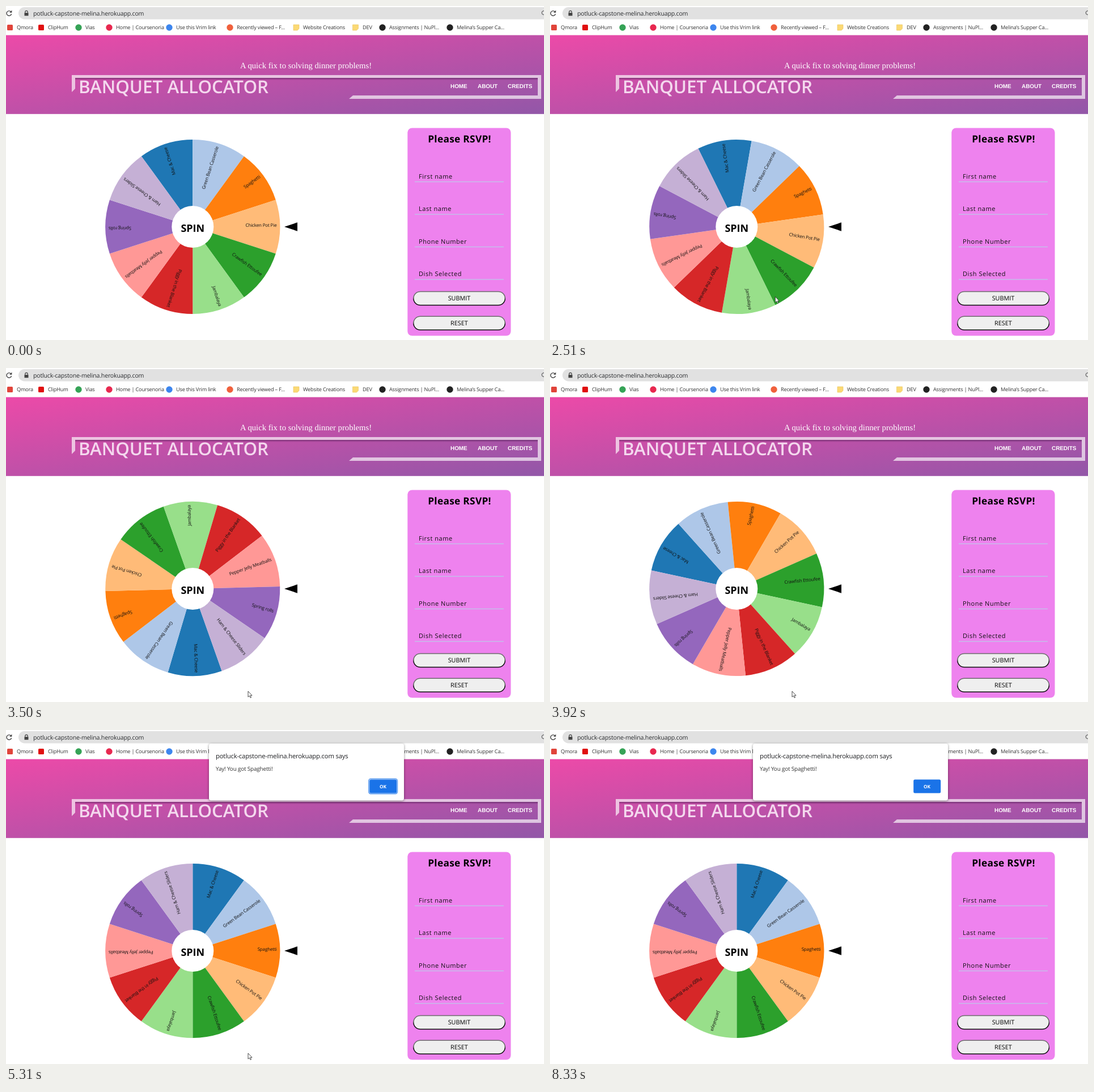
Write an HTML page that moves like this. It is 949x590 px and loops after 8390 ms.

```html
<!DOCTYPE html>
<html lang="en">
<head>
<meta charset="utf-8">
<title>Dinner wheel</title>
<style>
  html, body { margin: 0; width: 100%; height: 100%; overflow: hidden; background: #fff; }
  svg { display: block; width: 100vw; height: 100vh; font-family: "Open Sans", "Noto Sans", sans-serif; text-rendering: geometricPrecision; }
  .url { font-size: 10.6px; letter-spacing: -.2px; fill: #2b2d30; }
  .marks { font-size: 9.2px; letter-spacing: -.2px; fill: #333; }
  .tagline { font: 14.67px "Liberation Serif", serif; fill: #fff; }
  .title { font-size: 31.3px; font-weight: 600; fill: #f4d8ee; }
  .nav { font: bold 9.9px "Liberation Sans", sans-serif; fill: #fff; }
  .dish { font-size: 8px; letter-spacing: -.15px; text-anchor: end; fill: #111; }
  .mid { text-anchor: middle; }
  .spin { font-size: 18px; font-weight: 700; }
  .rsvp { font-size: 17.3px; font-weight: 700; letter-spacing: .3px; }
  .field { font-size: 11px; letter-spacing: .55px; fill: #111; }
  .button { font-size: 10.8px; }
  .says { font-size: 11.3px; letter-spacing: -.2px; fill: #202124; }
  .news { font-size: 9.9px; letter-spacing: -.15px; fill: #333; }
  .ok { font-size: 8.3px; font-weight: 700; fill: #fff; }
  #dialog > rect:first-child { filter: drop-shadow(0 1px 2px rgba(0, 0, 0, .45)); }
</style>
</head>
<body>
<svg viewBox="0 0 949 590" preserveAspectRatio="none">
  <defs>
    <linearGradient id="banner" x2="1" y2="1">
      <stop stop-color="#ec4aa8"/><stop offset="1" stop-color="#9257a8"/>
    </linearGradient>
    <linearGradient id="shade" x2="0" y2="1">
      <stop stop-color="#4a1850" stop-opacity=".6"/><stop offset="1" stop-color="#4a1850" stop-opacity="0"/>
    </linearGradient>
    <linearGradient id="outset" x2="0" y2="1">
      <stop offset=".4" stop-color="#6c6c6c"/><stop offset=".6" stop-color="#0c0c0c"/>
    </linearGradient>
  </defs>

  <!-- browser bar -->
  <rect x="22" y="2" width="960" height="21.5" rx="10.7" fill="#e1e1e1"/>
  <g fill="none" stroke="#444" stroke-width="1.4">
    <path d="M8.8 10.2A4.3 4.3 0 1 0 9.6 14"/>
    <path d="M33.8 12V10.6a2.2 2.2 0 0 1 4.4 0V12" stroke-width="1.2"/>
    <circle cx="948.5" cy="12" r="3.4" stroke-width="1"/>
  </g>
  <path d="M10.4 7.4V11.8H6Z M32.5 12h7v5.2h-7Z" fill="#444"/>
  <text class="url" x="48" y="16.8">potluck-capstone-melina.herokuapp.com</text>
  <g id="marks" class="marks"></g>

  <!-- page header -->
  <rect y="51.5" width="949" height="139.3" fill="url(#banner)"/>
  <rect x="122" y="127" width="816" height="4" fill="url(#shade)"/>
  <path d="M116 122H944V164H605L612 158H938V127H122V146L116 152Z" fill="#fff" fill-opacity=".66"/>
  <text class="tagline" x="413" y="110">A quick fix to solving dinner problems!</text>
  <text class="title" x="128" y="154">BANQUET ALLOCATOR</text>
  <g class="nav">
    <text x="784" y="145">HOME</text><text x="832" y="145">ABOUT</text><text x="885" y="145">CREDITS</text>
  </g>

  <!-- wheel -->
  <g transform="translate(329.3 390)">
    <g id="wheel"></g>
    <circle r="37" fill="#fff"/>
    <text class="spin mid" y="9.2">SPIN</text>
  </g>
  <path d="M491 390L514 382.3V397.7Z"/>

  <!-- form -->
  <rect x="708.3" y="215.5" width="182.2" height="367" rx="8" fill="#ee82ee"/>
  <text class="rsvp mid" x="800" y="241">Please RSVP!</text>
  <g id="fields"></g>

  <!-- alert -->
  <g id="dialog">
    <rect x="358" y="24" width="344" height="100.5" rx="4" fill="#fff"/>
    <text class="says" x="370" y="49.5">potluck-capstone-melina.herokuapp.com says</text>
    <text class="news" x="370" y="71.6">Yay! You got Spaghetti!</text>
    <rect id="ring" x="639.8" y="86.2" width="50.6" height="26.4" rx="3.5" fill="#fff" stroke="#5b9bf0" stroke-width="1.6"/>
    <rect x="641.2" y="87.6" width="48" height="23.8" rx="2.5" fill="#1a73e8"/>
    <text class="ok mid" x="665" y="102.6">OK</text>
  </g>

  <!-- mouse -->
  <circle id="glow" cx="330.5" cy="388.5" r="9.5" fill="#f5e614" fill-opacity=".72"/>
  <g id="mouse">
    <path id="arrow" d="M0 0V10.2L2.4 8 4 11.6 5.6 10.9 4.1 7.4H7Z" fill="#fff" stroke="#222" stroke-width=".8"/>
    <path id="beam" d="M-2.5 -6.5H2.5M0 -6.5V6.5M-2.5 6.5H2.5" fill="none" stroke="#333"/>
  </g>
</svg>
<script>
const LOOP = 8390, TICK = 69.8;
const $ = id => document.getElementById(id);

const bookmarks = [
  [19, 'Qmora', 7, '#e0443a', 'square'],
  [74, 'ClipHum', 62, '#e00f0f', 'square'],
  [140, 'Vias', 128, '#35a356', 'circle'],
  [194, 'Home | Coursenoria', 182, '#e8284f', 'circle'],
  [300, 'Use this Vrim link', 288, '#3d86ee', 'circle'],
  [407, 'Recently viewed – F...', 395, '#f0603c', 'circle'],
  [524, 'Website Creations', 512, '#fbd975', 'folder'],
  [629, 'DEV', 616.5, '#fbd975', 'folder'],
  [676, 'Assignments | NuPl...', 664, '#222', 'circle'],
  [795, 'Melina’s Supper Ca...', 783, '#222', 'circle']
];
const icons = {
  square: (x, c) => `<rect x="${x - 5}" y="33" width="10" height="10" rx="1.5" fill="${c}"/>`,
  circle: (x, c) => `<circle cx="${x}" cy="38" r="5.7" fill="${c}"/>`,
  folder: (x, c) => `<path d="M${x - 5} 33h10v7l-3 3h-7Z" fill="${c}" stroke="#eac35a" stroke-width=".6"/>`
};
$('marks').innerHTML = bookmarks.map(([x, name, ix, color, kind]) =>
  icons[kind](ix, color) + `<text x="${x}" y="41.2">${name}</text>`).join('');

const dishes = [
  ['Mac &amp; Cheese', '#1f77b4'], ['Green Bean Casserole', '#aec7e8'],
  ['Spaghetti', '#ff7f0e'], ['Chicken Pot Pie', '#ffbb78'],
  ['Crawfish Ettoufee', '#2ca02c'], ['Jambalaya', '#98df8a'],
  ['Piggy in the Blanket', '#d62728'], ['Pepper Jelly Meatballs', '#ff9896'],
  ['Spring rolls', '#9467bd'], ['Ham &amp; Cheese Sliders', '#c5b0d5']
];
const R = 154, half = Math.PI / 10;
const ex = R * Math.cos(half), ey = R * Math.sin(half);
$('wheel').innerHTML = dishes.map(([name, color], i) =>
  `<g transform="rotate(${i * 36 - 72})">
    <path d="M0 0L${ex} ${-ey}A${R} ${R} 0 0 1 ${ex} ${ey}Z" fill="${color}"/>
    <text class="dish" x="148.2">${name}</text></g>`).join('');

const field = (name, i) => {
  const y = 304.7 + i * 57.5;
  return `<text class="field" x="728" y="${y}">${name}</text>
    <path d="M721 ${y + 5.8}H878" stroke="#c5bdea" stroke-width="1.5"/>`;
};
const button = (name, y) =>
  `<rect x="718.8" y="${y}" width="161.6" height="24" rx="12" fill="#efefef" stroke="url(#outset)" stroke-width="1.5"/>
   <text class="button mid" x="799.4" y="${y + 15.6}">${name}</text>`;
$('fields').innerHTML =
  ['First name', 'Last name', 'Phone Number', 'Dish Selected'].map(field).join('') +
  button('SUBMIT', 504.5) + button('RESET', 548.3);

// start, end, from x, y, to x, y
const moves = [
  [170, 950, 789, 543, 360, 397],
  [1020, 1230, 356, 398, 333, 391],
  [1960, 2860, 335, 393, 427, 571],
  [6030, 6170, 455, 577, 512, 592],
  [7110, 7590, 890, 586, 917, 579],
  [8050, 8190, 915, 584, 912, 592]
];
const clamp = v => Math.min(1, Math.max(0, v));
const smooth = p => p * p * (3 - 2 * p);
const cubic = p => p < .5 ? 4 * p ** 3 : 1 - 4 * (1 - p) ** 3;
const held = (t, start) => Math.floor((t - start + 8) / TICK) * TICK;
const show = (id, on) => { $(id).style.visibility = on ? 'visible' : 'hidden'; };

function drawMouse(t) {
  const move = moves.filter(m => m[0] <= t).pop();
  show('mouse', move);
  if (!move) return;
  const [start, end, x0, y0, x1, y1] = move;
  const p = smooth(clamp(held(t, start) / (end - start)));
  const x = x0 + (x1 - x0) * p, y = y0 + (y1 - y0) * p;
  $('mouse').setAttribute('transform', `translate(${x} ${y})`);
  const overText = t >= 1090 && t < 1960;
  $('beam').style.display = overText ? '' : 'none';
  $('arrow').style.display = overText ? 'none' : '';
}

function draw(t) {
  const u = held(t, 1960);
  const turn = -36 + 396 * cubic(clamp((u + 12) / 3103));
  $('wheel').setAttribute('transform', `rotate(${turn})`);
  $('dialog').style.opacity = clamp((u - 45 * TICK) / (2.5 * TICK));
  show('ring', t < 8260);
  show('glow', t >= 1760 && t < 1960);
  drawMouse(t);
}

const began = performance.now();
function frame() {
  draw((performance.now() - began) % LOOP);
  requestAnimationFrame(frame);
}
frame();
</script>
</body>
</html>
```
